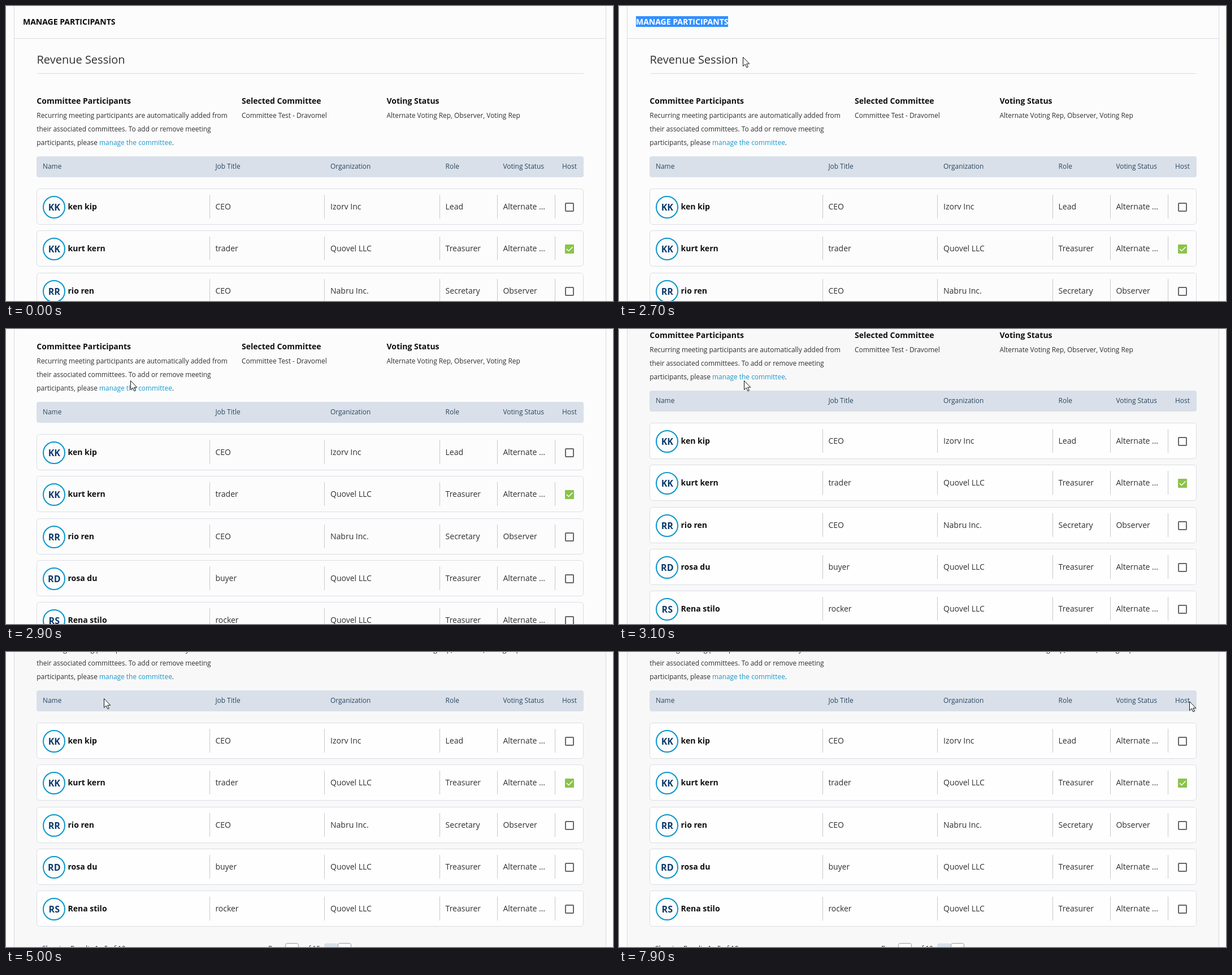
Recreate the animation shown at these times as an HTML page. Size 1074 by 522 pixels, loop 8000 ms.

```html
<!DOCTYPE html>
<html lang="en">
<head>
<meta charset="utf-8">
<title>Manage participants</title>
<style>
  html, body { margin: 0; width: 100%; height: 100%; overflow: hidden; background: #fcfcfc; }
  svg { display: block; font-family: "Open Sans", sans-serif; font-size: 14px; fill: #303030; }
  .bold { font-weight: 700; fill: #101010; }
  .small { font-size: 11.9px; }
  .head { font-size: 11.9px; fill: #2c4560; }
  .mid { text-anchor: middle; }
  .badge { font-size: 16px; font-weight: 700; fill: #0b3a6b; }
  .link { fill: #1899cf; }
  .card { fill: var(--card); stroke: #dadde3; }
  .panel { fill: var(--panel); stroke: #d6dae4; }
  .rule { stroke: #d9dce3; }
  .sep { stroke: #c6c8ca; }
  .bar { fill: #d9e0e9; }
  .box { fill: #fff; stroke: #8f9aa8; }
</style>
</head>
<body>
<svg id="stage" width="1074" height="522" viewBox="0 0 1074 522"></svg>
<script>
const stage = document.getElementById('stage');

const text = (x, y, s, cls = '') => `<text x="${x}" y="${y}" class="${cls}">${s}</text>`;
const line = (x1, y1, x2, y2, cls) => `<line x1="${x1}" y1="${y1}" x2="${x2}" y2="${y2}" class="${cls}"/>`;
const rect = (x, y, w, h, cls, rx = 0) =>
  `<rect x="${x}" y="${y}" width="${w}" height="${h}" rx="${rx}" class="${cls}"/>`;

const colX = units => 65 + 101.8 * units;
const columns = { 'Job Title': 3, Organization: 5, Role: 7, 'Voting Status': 8 };
const starts = Object.values(columns);
const hostX = 997;
const people = [
  ['KK', 'ken kip', 'CEO', 'Izorv Inc', 'Lead', 'Alternate …'],
  ['KK', 'kurt kern', 'trader', 'Quovel LLC', 'Treasurer', 'Alternate …'],
  ['RR', 'rio ren', 'CEO', 'Nabru Inc.', 'Secretary', 'Observer'],
  ['RD', 'rosa du', 'buyer', 'Quovel LLC', 'Treasurer', 'Alternate …'],
  ['RS', 'Rena stilo', 'rocker', 'Quovel LLC', 'Treasurer', 'Alternate …']
];

const checkbox = (y, on) => on
  ? `<rect x="989" y="${y}" width="16" height="16" rx="1" fill="#8bc34a"/>
     <path d="M992 ${y + 8}l3.5 3.5 7-7" fill="none" stroke="#fff" stroke-width="1.5"/>`
  : `<rect x="990" y="${y + 1}" width="14" height="14" rx="1" fill="none" stroke="#666" stroke-width="2"/>`;

function row([initials, name, ...cells], i) {
  const y = 323 + Math.round(74.3 * i);
  return rect(54.5, y + .5, 967, 63, 'card', 5) +
    `<circle cx="85" cy="${y + 33}" r="19" fill="#fdfdfd" stroke="#0896cc" stroke-width="2"/>` +
    text(85.3, y + 38.5, initials, 'badge mid') +
    text(109.5, y + 37, name, 'bold') +
    cells.map((s, c) => text(colX(starts[c]), y + 37, s)).join('') +
    [...starts, 9].map(u => Math.floor(colX(u) - 10.1) + .5).map(x => line(x, y + 11, x, y + 53, 'sep')).join('') +
    checkbox(y + 25, i === 1);
}

const section = (x, heading, ...lines) => text(x, 173, heading, 'bold') +
  lines.map((s, i) => text(x, 198 + 24 * i, s, 'small')).join('');

const title = fill => `<text x="30" y="33" font-weight="700" fill="${fill}">MANAGE PARTICIPANTS</text>`;

const page = [
  rect(14.5, -20, 1047, 1000, 'panel'),
  title('#080808'),
  `<g clip-path="url(#picked)"><rect x="30" y="18" width="163" height="19" fill="#3390ff"/>${title('#fff')}</g>`,
  line(14, 57.5, 1062, 57.5, 'rule'),
  '<text x="54.5" y="102" font-size="20">Revenue Session</text>',
  line(55, 119.5, 1022, 119.5, 'rule'),
  section(54.3, 'Committee Participants',
    'Recurring meeting participants are automatically added from',
    'their associated committees. To add or remove meeting',
    'participants, please <tspan class="link">manage the committee</tspan>.'),
  section(417, 'Selected Committee', 'Committee Test - Dravomel'),
  section(673.5, 'Voting Status', 'Alternate Voting Rep, Observer, Voting Rep'),
  rect(54, 266, 968, 37, 'bar', 4),
  text(65, 288, 'Name', 'head'),
  ...Object.entries(columns).map(([s, u]) => text(colX(u), 288, s, 'head')),
  text(hostX, 288, 'Host', 'head mid'),
  ...people.map(row),
  text(64, 727, 'Showing Results 1 - 5 of 10', 'small'),
  text(464, 727, 'Page', 'small'),
  rect(494.5, 713.5, 23, 24, 'box', 3),
  text(528, 727, 'of 10', 'small'),
  rect(563, 713.5, 24, 24, 'bar', 3),
  rect(587.5, 713.5, 23, 24, 'box', 3)
].join('');

stage.innerHTML = `
  <clipPath id="picked"><rect id="pick" x="30" y="18" height="19" width="0"/></clipPath>
  <g id="page">${page}</g>
  <path id="beam" d="M-3 -8.5h2.5l.5.5.5-.5h2.5M0 -8v16M-3 8.5h2.5l.5-.5.5.5h2.5" fill="none" stroke="#222"/>
  <path id="arrow" d="M.5 .5v16l3.7-3.5 2.8 5.9 2.4-1.1-2.7-5.6h5z" fill="#fff" stroke="#111"/>`;

const [pageEl, pick, beam, arrow] = ['page', 'pick', 'beam', 'arrow'].map(id => document.getElementById(id));

// Share of the way from a to b, 0 to 1
const ramp = (t, a, b) => Math.min(1, Math.max(0, (t - a) / (b - a)));

// Arrow stops: ms, x, y
const stops = [
  [2500, 193, 28], [2700, 219, 90], [3300, 222, 92], [3700, 543, 165], [3900, 835, 182],
  [4900, 276, 80], [5000, 173, 82], [5400, 69, 66], [6000, 474, 97], [6300, 562, 93],
  [7000, 828, 75], [7100, 952, 68], [7500, 1020, 82], [7900, 1009, 87]
];

function pointer(t) {
  let [, x, y] = stops[0];
  stops.slice(1).forEach(([end, toX, toY], i) => {
    const p = ramp(t, stops[i][0], end);
    x += (toX - stops[i][1]) * p;
    y += (toY - stops[i][2]) * p;
  });
  return [Math.round(x), Math.round(y)];
}

const place = (el, x, y, shown) => {
  el.setAttribute('transform', `translate(${x} ${y})`);
  el.style.display = shown ? '' : 'none';
};

function draw(now) {
  const t = Math.floor(now % 8000 / 100) * 100; // ten steps a second
  const picked = 163 * ramp(t, 1800, 2200);
  const hover = 8 * (1 + Math.cos(t / 300)) * (1 - ramp(t, 1200, 1800));
  const scroll = Math.round(137 * ramp(t, 2700, 2900) + 61 * ramp(t, 3000, 3300));
  const scrolled = t >= 3100;

  pageEl.setAttribute('transform', `translate(0 ${-scroll})`);
  pick.setAttribute('width', picked);
  stage.style.setProperty('--panel', scrolled ? '#f8f8f8' : '#fcfcfc');
  stage.style.setProperty('--card', scrolled ? '#fefefe' : '#fcfcfc');
  place(beam, Math.round(30 + hover + picked) + .5, 27, t >= 200 && t < 2600);
  place(arrow, ...pointer(t), t >= 2600);
  requestAnimationFrame(draw);
}
draw(performance.now());
</script>
</body>
</html>
```
